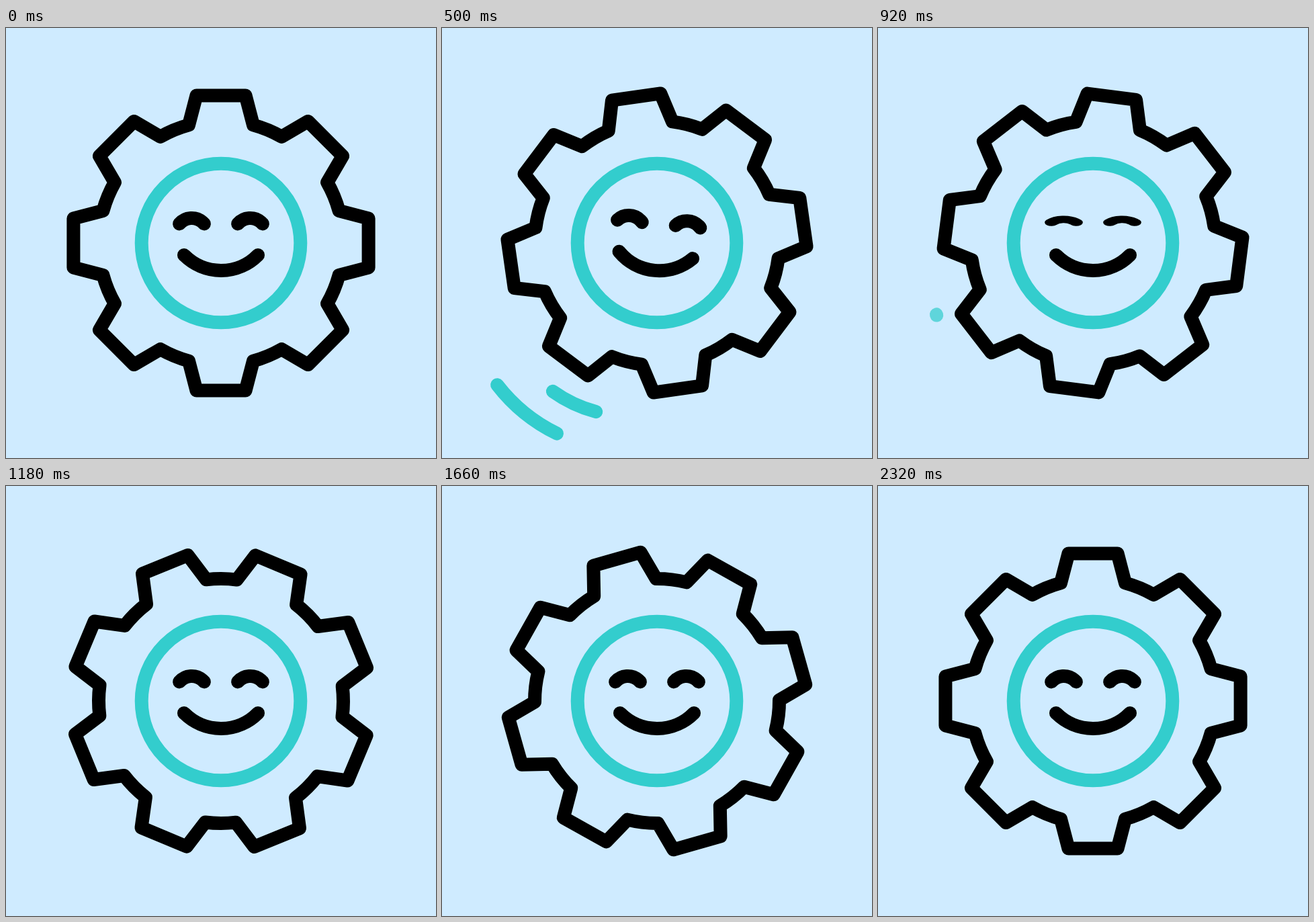
These frames come from a looping animation (640 by 640 pixels, 2.42 s). An HTML page with a canvas:

```html
<!DOCTYPE html>
<html lang="en">
<head>
<meta charset="utf-8">
<title>Happy gear</title>
<style>
  html, body { margin: 0; width: 100%; height: 100%; overflow: hidden; background: #cfebff; }
  canvas { display: block; width: 640px; height: 640px; }
</style>
</head>
<body>
<canvas id="stage" width="640" height="640"></canvas>
<script>
const ctx = document.getElementById('stage').getContext('2d');
const LOOP = 2420;
const CENTER = 320;
const TEAL = '#33cdcd';
const rad = deg => deg * Math.PI / 180;
const progress = (t, from, to) => Math.min(1, Math.max(0, (t - from) / (to - from)));
const smooth = u => u * u * (3 - 2 * u);

// Cubic bezier easing (x1, 0, x2, 1), solved by bisection.
function ease(u, x1 = 0.383, x2 = 0.203) {
  let lo = 0, hi = 1;
  for (let i = 0; i < 24; i++) {
    const s = (lo + hi) / 2, w = 1 - s;
    if (3 * w * w * s * x1 + 3 * w * s * s * x2 + s * s * s < u) lo = s;
    else hi = s;
  }
  return smooth(lo);
}

// Smoothly interpolates [time, value] keys.
function track(t, keys) {
  let value = keys[0][1];
  for (let i = 1; i < keys.length; i++) {
    const [from, a] = keys[i - 1], [to, b] = keys[i];
    if (t >= from) value = a + (b - a) * smooth(progress(t, from, to));
  }
  return value;
}

const gearAngle = t => t < 380
  ? track(t, [[120, 0], [380, -10]])
  : -10 + 190 * ease(progress(t, 380, 2320));
const faceAngle = t => track(t, [[0, 0], [260, -10], [540, 6.3], [800, 0]]);
const eyeScale = t => track(t, [[860, 1], [980, 0.1], [1100, 1]]);

const swooshes = [
  { radius: 200, from: 105, to: 166, head: [377, 817], tail: [525, 965] },
  { radius: 251, from: 116, to: 152.7, head: [300, 740], tail: [515, 905] }
];

function drawGear(angle) {
  ctx.save();
  ctx.translate(CENTER, CENTER);
  ctx.rotate(rad(angle));
  ctx.beginPath();
  for (let i = 0; i < 8; i++) {
    ctx.lineTo(-36.5, -219.6);
    ctx.lineTo(36.5, -219.6);
    ctx.arc(0, 0, 182, rad(-74.7), rad(-60.3));
    ctx.rotate(rad(45));
  }
  ctx.closePath();
  ctx.stroke();
  ctx.restore();
}

function drawEye(x, scale) {
  ctx.save();
  ctx.translate(x, -33);
  ctx.scale(1, scale);
  ctx.beginPath();
  ctx.arc(0, 20.4, 24.4, rad(-139), rad(-41));
  ctx.stroke();
  ctx.restore();
}

function drawFace(angle, scale) {
  ctx.save();
  ctx.translate(CENTER, CENTER);
  ctx.rotate(rad(angle));
  drawEye(-43.5, scale);
  drawEye(43.5, scale);
  ctx.beginPath();
  ctx.arc(0, -36.3, 77.3, rad(44.6), rad(135.4));
  ctx.stroke();
  ctx.restore();
}

function drawSwoosh({ radius, from, to, head, tail }, t) {
  const start = ease(progress(t, ...tail));
  const end = ease(progress(t, ...head));
  if (t <= head[0] || t >= tail[1] || end <= start) return;
  const at = u => rad(from + (to - from) * u);
  ctx.beginPath();
  ctx.arc(281, 378, radius, at(start), at(end));
  ctx.stroke();
}

function draw(t) {
  ctx.fillStyle = '#cfebff';
  ctx.fillRect(0, 0, 640, 640);
  ctx.lineWidth = 20;
  ctx.lineCap = ctx.lineJoin = 'round';

  ctx.strokeStyle = TEAL;
  ctx.globalAlpha = 1 - progress(t, 885, 1010);
  swooshes.forEach(swoosh => drawSwoosh(swoosh, t));
  ctx.globalAlpha = 1;
  ctx.beginPath();
  ctx.arc(CENTER, CENTER, 118.3, 0, 2 * Math.PI);
  ctx.stroke();

  ctx.strokeStyle = '#000';
  drawGear(gearAngle(t));
  drawFace(faceAngle(t), eyeScale(t));
}

const began = performance.now();
function tick() {
  draw((performance.now() - began) % LOOP);
  requestAnimationFrame(tick);
}
tick();
</script>
</body>
</html>
```
